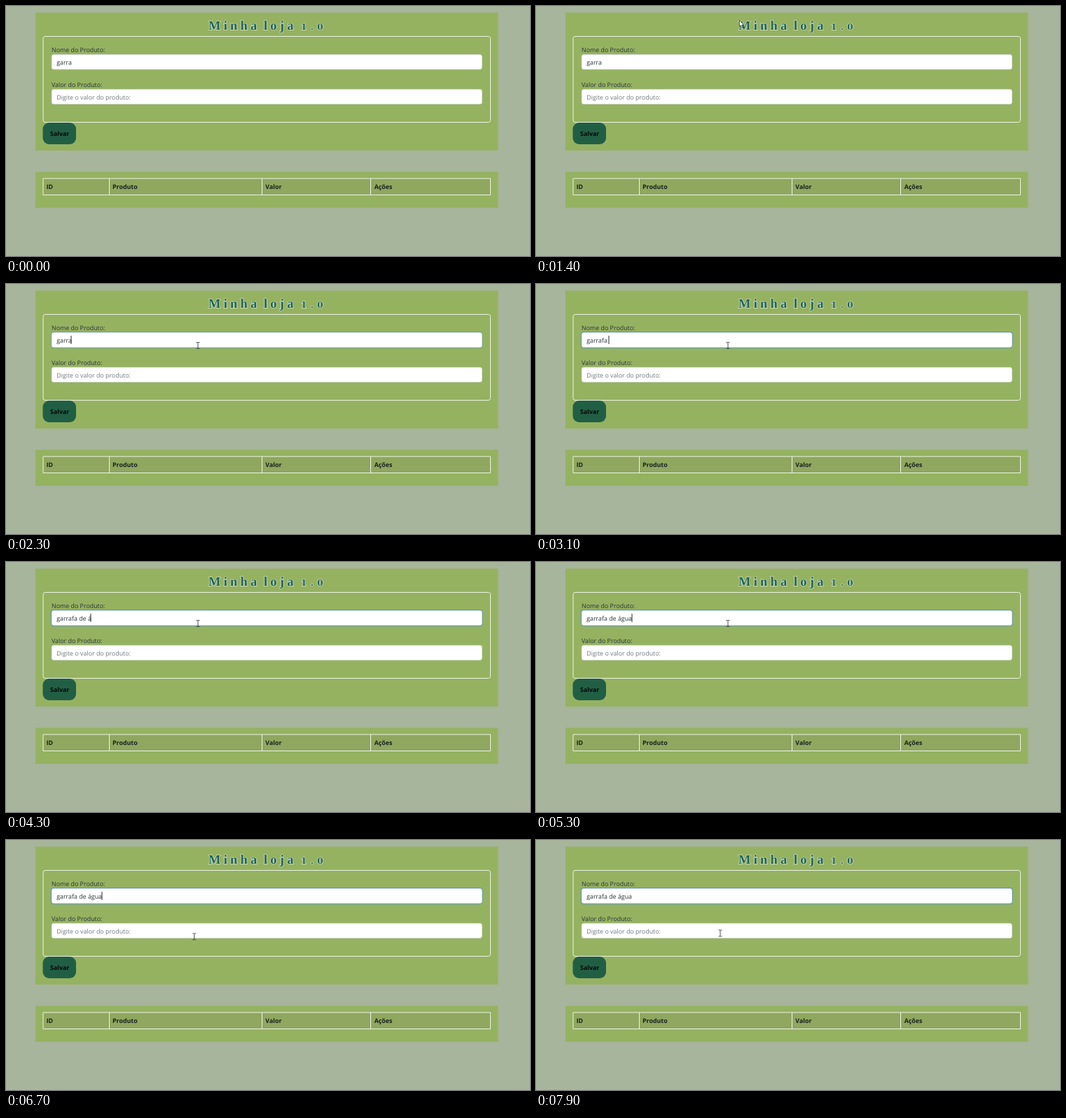
Recreate the animation shown at these times as an HTML page. Size 748 by 358 pixels, loop 8 s.

```html
<!DOCTYPE html>
<html lang="pt-BR">
<head>
<meta charset="utf-8">
<title>Minha loja</title>
<style>
  html, body { margin: 0; width: 100%; height: 100%; overflow: hidden; background: #a6b59b; }
  svg { display: block; width: 748px; height: 358px; }
  text { font: 8.87px "Open Sans", "Noto Sans", sans-serif; fill: #2a3438; text-rendering: geometricPrecision; white-space: pre; }
  .bold { font-weight: 700; fill: #18231f; }
  .hint { fill: #70777c; }
  .panel { fill: #95b261; }
  .line { fill: none; stroke: #eef3e4; }
  .field { fill: #fff; stroke: #ced4da; stroke-width: .6; }
  .title text { font: 700 18.5px "Liberation Serif", "Noto Serif", serif; fill: #1f6150; stroke: #dbe8dc; stroke-width: 1.3; paint-order: stroke; letter-spacing: 4.2px; }
  .title .digits { font: 700 12px "DejaVu Serif", serif; letter-spacing: 5.4px; }
</style>
</head>
<body>
<svg viewBox="0 0 748 358">
  <rect width="748" height="358" fill="#a6b59b"/>
  <rect class="panel" x="42" y="9.5" width="660.5" height="197.5"/>
  <rect class="panel" x="42" y="237.5" width="660.5" height="51.5"/>

  <g class="title">
    <text x="289" y="33.5">Minha</text>
    <text x="368" y="33.5">loja</text>
    <text class="digits" x="421" y="33.5">1.0</text>
  </g>

  <rect class="line" x="53" y="43.5" width="638.5" height="123" rx="3"/>
  <text x="65" y="66">Nome do Produto:</text>
  <text x="65" y="115.5">Valor do Produto:</text>

  <rect id="ring" x="63.7" y="68" width="617" height="24.2" rx="4.5" fill="#5f9ba0" opacity="0"/>
  <rect class="field" x="65.2" y="69.5" width="614.3" height="21.3" rx="3"/>
  <rect class="field" x="65.2" y="119.3" width="614.3" height="21.3" rx="3"/>
  <text id="typed" x="72.2" y="83.7"></text>
  <rect id="caret" y="74" width="1" height="12" fill="#22282c"/>
  <text class="hint" x="72.2" y="133.5">Digite o valor do produto:</text>

  <rect x="52.5" y="167" width="47.5" height="31" rx="9" fill="#215f45"/>
  <text class="bold" x="63" y="186" style="fill:#050a08">Salvar</text>

  <rect x="53" y="247" width="638.5" height="23.5" fill="#8fa75f"/>
  <path class="line" d="M53 247H691.5V270.5H53ZM147.5 247V270.5M365.5 247V270.5M520.5 247V270.5"/>
  <text class="bold" x="57.7" y="262">ID</text>
  <text class="bold" x="152" y="262">Produto</text>
  <text class="bold" x="370.3" y="262">Valor</text>
  <text class="bold" x="525.7" y="262">Ações</text>

  <path id="arrow" d="M.4 .4V9.4L2.4 7.6L3.9 11L5.4 10.3L3.9 7.1H6.7Z" fill="#fff" stroke="#26302c" stroke-width=".75"/>
  <path id="beam" d="M-2.4 -4.5H-.6L0 -4L.6 -4.5H2.4M0 -4V4M-2.4 4.5H-.6L0 4L.6 4.5H2.4" fill="none" stroke="#30383a" stroke-width=".9"/>
</svg>
<script>
const LOOP = 8000, TICK = 100;
const PHRASE = "garrafa de água";

// time, characters typed, caret shown
const typing = [
  [0, 5, 0], [2200, 5, 1], [2600, 5, 0], [2900, 6, 1], [3000, 7, 1], [3100, 8, 1],
  [3400, 9, 1], [3500, 10, 1], [3700, 11, 1], [3900, 11, 0], [4300, 12, 1],
  [4600, 13, 1], [4900, 14, 1], [5300, 15, 1], [5800, 15, 0], [6400, 15, 1], [7900, 15, 0]
];

// time, x, y of the pointer
const pointer = [
  [1400, 290, 20], [1900, 274, 88], [5900, 274, 88],
  [6000, 274, 89.5], [6400, 272, 141], [6600, 272, 141], [7100, 263, 133.5]
];

const [ring, typed, caret, arrow, beam] =
  ["ring", "typed", "caret", "arrow", "beam"].map(id => document.getElementById(id));

const clamp = v => Math.min(1, Math.max(0, v));
const easeOut = p => 1 - (1 - p) ** 2;
const show = (el, on) => el.setAttribute("visibility", on ? "visible" : "hidden");

function pointerAt(t) {
  const next = pointer.findIndex(key => key[0] > t);
  if (next < 0) return pointer[pointer.length - 1].slice(1);
  const [t0, x0, y0] = pointer[next - 1], [t1, x1, y1] = pointer[next];
  const p = easeOut((t - t0) / (t1 - t0));
  return [x0 + (x1 - x0) * p, y0 + (y1 - y0) * p];
}

function drawPointer(t) {
  const visible = t >= pointer[0][0];
  const [x, y] = visible ? pointerAt(t) : [0, 0];
  const overField = (y > 69 && y < 91) || (y > 119 && y < 140.5);
  for (const el of [arrow, beam]) el.setAttribute("transform", `translate(${x} ${y})`);
  show(arrow, visible && !overField);
  show(beam, visible && overField);
}

function draw(t) {
  const [, count, caretOn] = typing.findLast(key => key[0] <= t);
  const value = PHRASE.slice(0, count);
  if (typed.textContent !== value) typed.textContent = value;
  caret.setAttribute("x", Math.round(71.7 + typed.getComputedTextLength()) - .5);
  show(caret, caretOn);
  ring.setAttribute("opacity", clamp((t - 2170) / 230));
  drawPointer(t);
}

const start = performance.now();
function frame() {
  const t = (performance.now() - start) % LOOP;
  draw(Math.floor(t / TICK) * TICK);
  requestAnimationFrame(frame);
}
frame();
</script>
</body>
</html>
```
